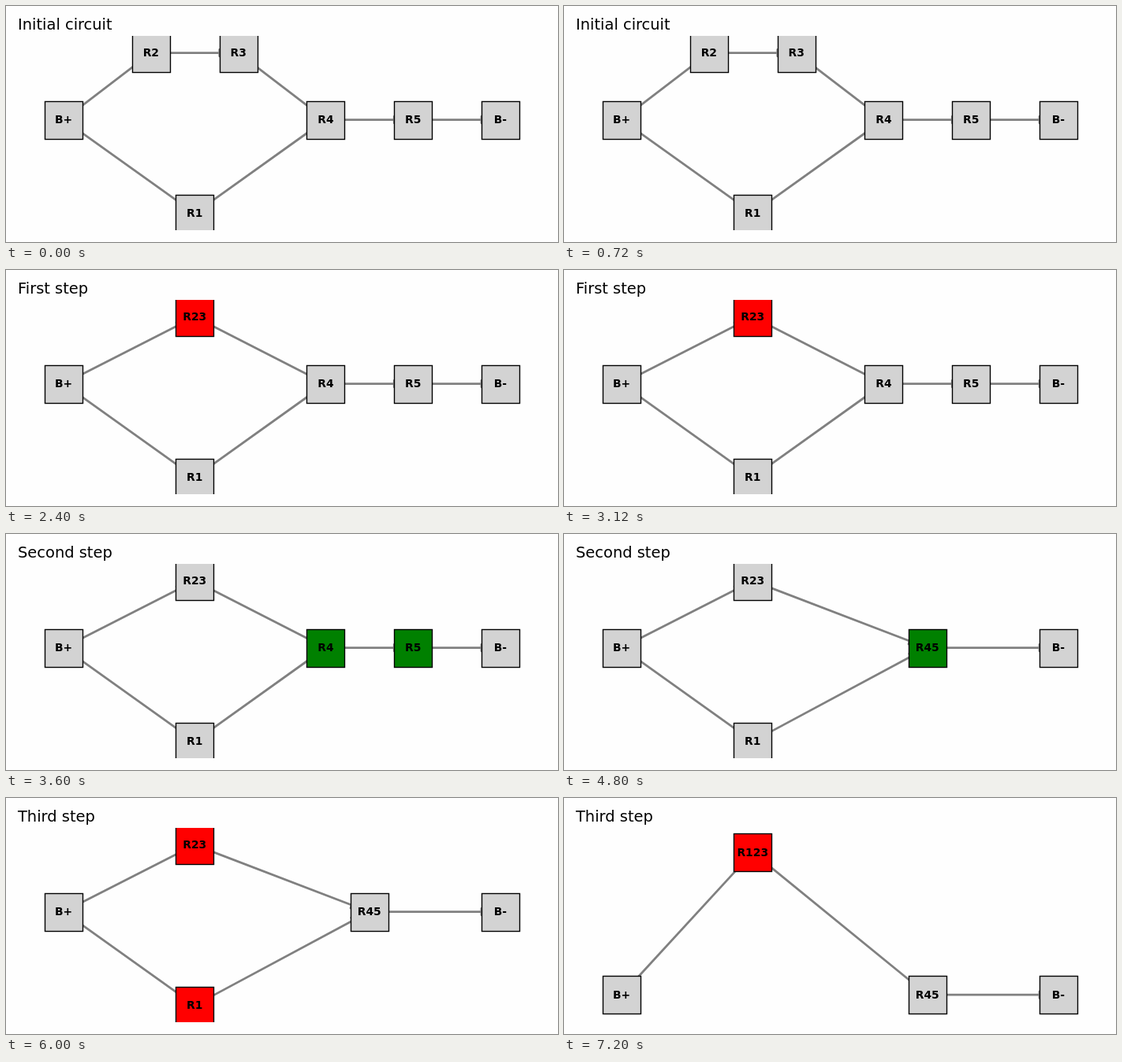
An HTML page with a canvas for the animation above (8 s loop, 700 by 300 pixels).

```html
<!DOCTYPE html>
<html lang="en">
<head>
<meta charset="utf-8">
<title>Circuit reduction</title>
<style>
  html, body { margin: 0; width: 100%; height: 100%; overflow: hidden; background: #fefefe; }
  canvas { display: block; }
</style>
</head>
<body>
<canvas id="stage" width="700" height="300"></canvas>
<script>
const ctx = document.getElementById('stage').getContext('2d');

const LOOP = 8000, STEP = 1200;
const LINE = 2.78, SIDE = 48;
const PLOT = { x: 15, y: 38, w: 670, h: 247 };

const column = i => 73.1 + 110.76 * i;
const TOP = 59.6, MIDDLE = 144.6, BOTTOM = 263.6;

const wide = {
  'B+': [column(0), MIDDLE],
  R1: [column(1.5), BOTTOM],
  R2: [column(1), TOP],
  R3: [column(2), TOP],
  R23: [column(1.5), TOP],
  R4: [column(3), MIDDLE],
  R5: [column(4), MIDDLE],
  R45: [column(3.5), MIDDLE],
  'B-': [column(5), MIDDLE]
};
const reduced = {
  'B+': [column(0), 250.2],
  R123: [column(1.5), 69.2],
  R45: [column(3.5), 250.2],
  'B-': [column(5), 250.2]
};

// Each circuit is a list of paths through its nodes.
const full = [['B+', 'R2', 'R3', 'R4', 'R5', 'B-'], ['B+', 'R1', 'R4']];
const merged = [['B+', 'R23', 'R4', 'R5', 'B-'], ['B+', 'R1', 'R4']];
const parallel = [['B+', 'R23', 'R45', 'B-'], ['B+', 'R1', 'R45']];
const series = [['B+', 'R123', 'R45', 'B-']];

const scene = (title, paths, marked = [], color = '', places = wide) =>
  ({ title, paths, marked, color, places });

const scenes = [
  scene('Initial circuit', full),
  scene('First step', full, ['R2', 'R3'], '#ff0000'),
  scene('First step', merged, ['R23'], '#ff0000'),
  scene('Second step', merged, ['R4', 'R5'], '#008000'),
  scene('Second step', parallel, ['R45'], '#008000'),
  scene('Third step', parallel, ['R23', 'R1'], '#ff0000'),
  scene('Third step', series, ['R123'], '#ff0000', reduced)
];

function drawEdge([x1, y1], [x2, y2]) {
  const length = Math.hypot(x2 - x1, y2 - y1);
  ctx.save();
  ctx.translate(x1, y1);
  ctx.rotate(Math.atan2(y2 - y1, x2 - x1));
  ctx.strokeStyle = ctx.fillStyle = '#808080';
  ctx.lineWidth = LINE;
  ctx.lineJoin = 'round';
  ctx.beginPath();
  ctx.moveTo(0, 0);
  ctx.lineTo(length - 20, 0);
  ctx.stroke();
  // Arrowhead, mostly hidden behind the node.
  ctx.beginPath();
  ctx.moveTo(length - 15, 0);
  ctx.lineTo(length - 23.9, -4.2);
  ctx.lineTo(length - 23.9, 4.2);
  ctx.closePath();
  ctx.fill();
  ctx.stroke();
  ctx.restore();
}

function drawNode([x, y], color) {
  const left = Math.round(x) + 0.5 - SIDE / 2;
  const top = Math.round(y) + 0.5 - SIDE / 2;
  ctx.fillStyle = color;
  ctx.strokeStyle = '#000';
  ctx.lineWidth = 1.39;
  ctx.fillRect(left, top, SIDE, SIDE);
  ctx.strokeRect(left, top, SIDE, SIDE);
}

function drawScene({ title, paths, marked, color, places }) {
  const names = [...new Set(paths.flat())];
  ctx.fillStyle = '#fefefe';
  ctx.fillRect(0, 0, 700, 300);

  ctx.save();
  ctx.beginPath();
  ctx.rect(PLOT.x, PLOT.y, PLOT.w, PLOT.h);
  ctx.clip();
  for (const path of paths)
    for (let i = 1; i < path.length; i++)
      drawEdge(places[path[i - 1]], places[path[i]]);
  for (const name of names)
    drawNode(places[name], marked.includes(name) ? color : '#d3d3d3');
  ctx.restore();

  ctx.fillStyle = '#000';
  ctx.textAlign = 'left';
  ctx.font = '19.44px "DejaVu Sans", sans-serif';
  ctx.fillText(title, 15, 30);
  ctx.textAlign = 'center';
  ctx.font = 'bold 13.89px "DejaVu Sans", sans-serif';
  for (const name of names) {
    const [x, y] = places[name];
    ctx.fillText(name, x, Math.round(y + 4.4));
  }
}

const start = performance.now();
function tick() {
  const time = (performance.now() - start) % LOOP;
  drawScene(scenes[Math.floor(time / STEP)]);
  requestAnimationFrame(tick);
}
tick();
</script>
</body>
</html>
```
